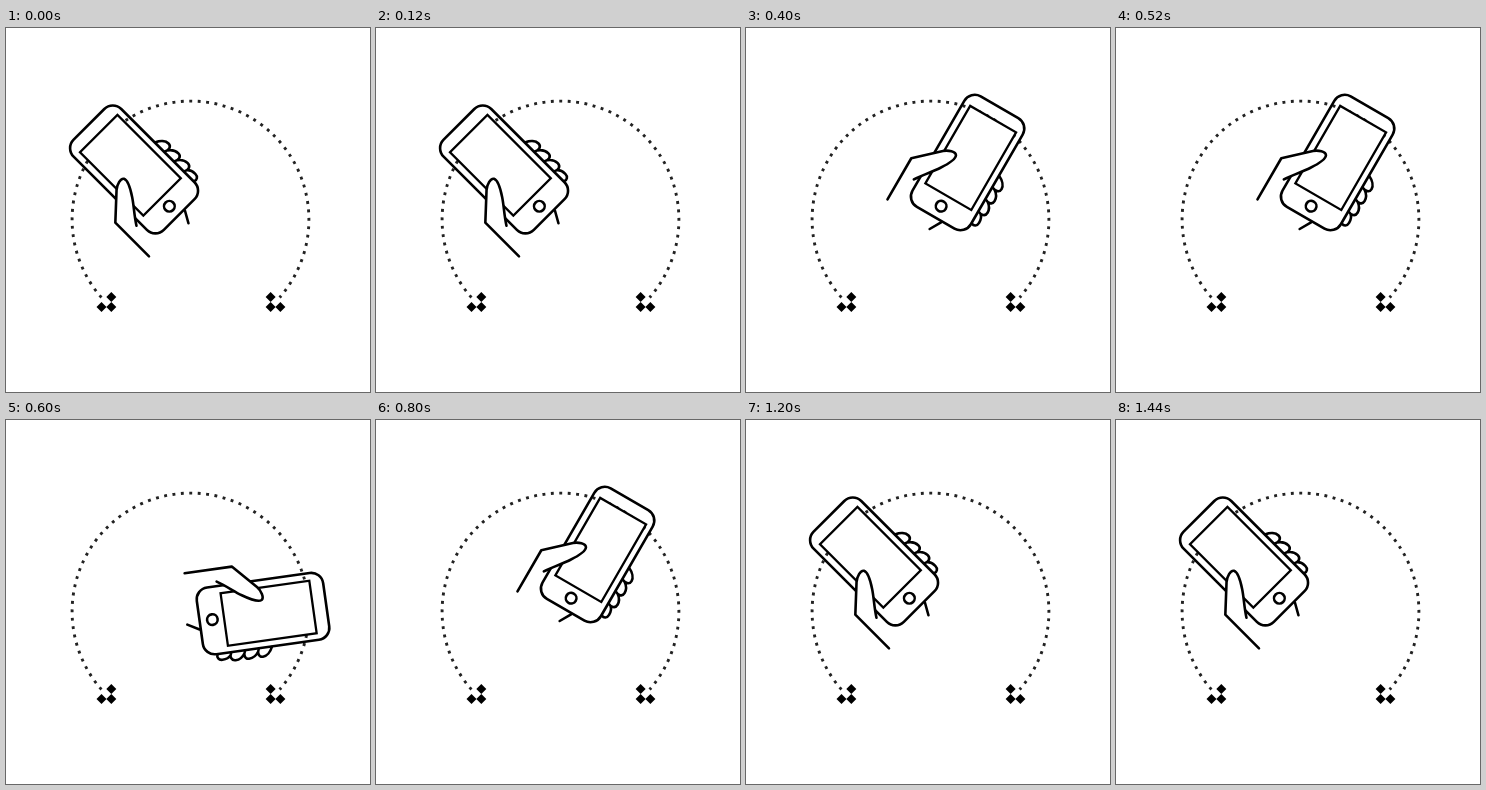
These frames come from a looping animation (364x364 px, 1.6 s). An HTML page:

```html
<!DOCTYPE html>
<html lang="en">
<head>
<meta charset="utf-8">
<title>Rotating phone</title>
<style>
  html, body { margin: 0; width: 100%; height: 100%; overflow: hidden; background: #fff; }
  svg { display: block; width: 100vw; height: 100vh; }
</style>
</head>
<body>
<svg viewBox="0 0 364 364">
  <defs>
    <path id="gem" d="M0-5 5 0 0 5-5 0z"/>
    <g id="gems">
      <use href="#gem"/>
      <use href="#gem" y="10"/>
      <use href="#gem" x="-9.8" y="10"/>
    </g>
  </defs>

  <!-- 65 dots, spaced evenly from end to end -->
  <path id="arc" fill="none" stroke="#222" stroke-width="2.9"/>
  <use href="#gems" x="105.3" y="269.1"/>
  <use href="#gems" transform="translate(264.6 269.1) scale(-1 1)"/>

  <!-- Hand and phone, drawn upright around the phone's centre -->
  <g id="phone" fill="none" stroke="#000" stroke-width="2.6" stroke-linecap="round" stroke-linejoin="round">
    <path d="M7 65 0.5 76.5"/>
    <path d="M34.5-4C39-2 42.8 2 42.8 6 42.8 10.5 38 11 34.5 9.2
             M37 10C40 12 42.8 16 42.8 20 42.8 24.5 38 25 34.5 23
             M37 24C40 26 42.5 30 42.5 33.5 42.5 38 38 39 34.5 37
             M37 38C39.5 40 40.2 43.5 40.2 46.5 40.2 50.5 37 52 34.5 50.8"/>
    <rect x="-33.6" y="-63.8" width="67.4" height="127.6" rx="12"/>
    <rect x="-26" y="-50.4" width="53" height="89.6" fill="#fff" stroke-width="2.3" stroke-linejoin="miter"/>
    <circle cx="-1" cy="51" r="5.3"/>
    <path fill="#fff" d="M-50.8 72V24.4L-27 2.3C-23-1.3-15.5-3.6-13.6-.5-11.8 3-16 11-21 18.5-26 26-32 32-38 41.5"/>
  </g>
</svg>
<script>
  const CX = 184.5, CY = 191.5, R = 118.4, SPAN = 261, DOTS = 65;
  const STEP = 200;
  // centre x, centre y, rotation
  const poses = [
    [128, 141.5, -45],
    [183, 122, 0],
    [221.5, 134.5, 30],
    [257, 193.5, 82]
  ];
  const order = [0, 1, 2, 3, 2, 1, 0, 0];

  const arc = document.getElementById('arc');
  const phone = document.getElementById('phone');

  const gap = SPAN / (DOTS - 1) * Math.PI / 180 * R;
  const half = (SPAN / 2) * Math.PI / 180 + 1.45 / R;
  const dx = R * Math.sin(half), y = CY - R * Math.cos(half);
  arc.setAttribute('d', `M${CX - dx} ${y}A${R} ${R} 0 1 1 ${CX + dx} ${y}`);
  arc.setAttribute('stroke-dasharray', `2.9 ${gap - 2.9}`);

  function draw(now) {
    const [x, y, turn] = poses[order[Math.floor(now / STEP) % order.length]];
    phone.setAttribute('transform', `translate(${x} ${y}) rotate(${turn})`);
  }

  const start = performance.now();
  function tick() {
    draw(performance.now() - start);
    requestAnimationFrame(tick);
  }
  tick();
</script>
</body>
</html>
```
